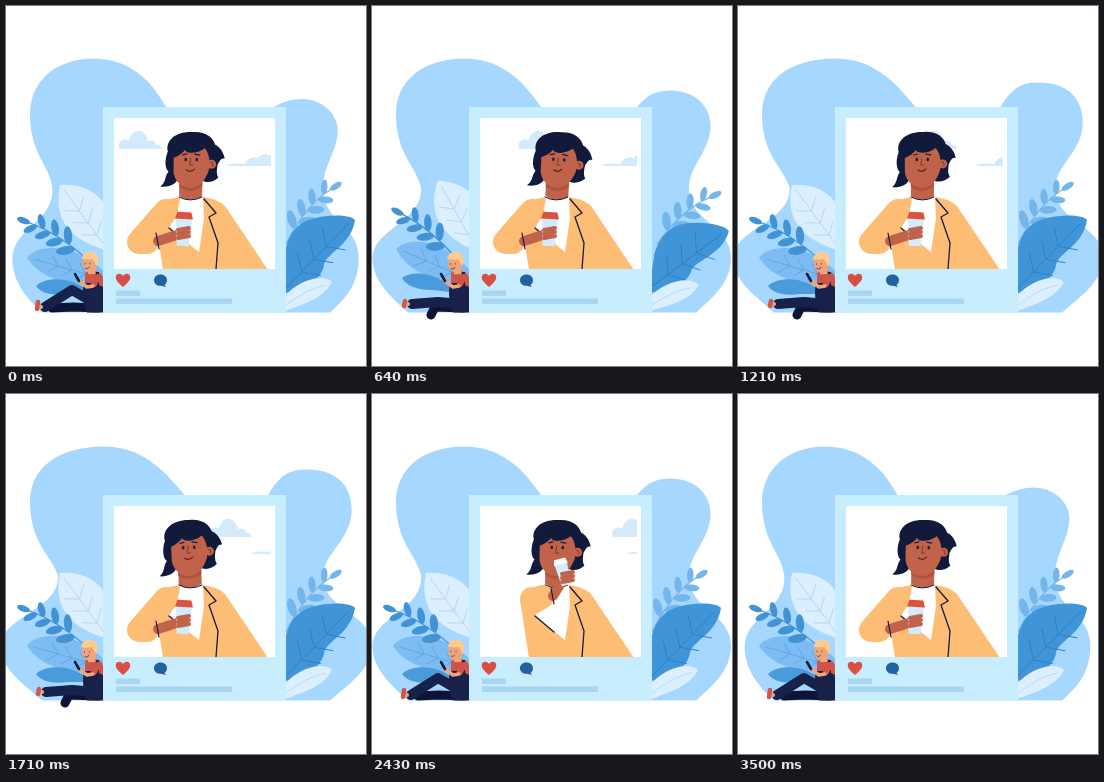
An HTML page that plays this animation: 360 px wide and 360 px high, repeating every 3.57 s.

```html
<!DOCTYPE html>
<html lang="en">
<head>
<meta charset="utf-8">
<title>Photo post</title>
<style>
html, body { margin: 0; width: 100%; height: 100%; overflow: hidden; background: #fff; }
svg { display: block; width: 100vw; height: 100vh; }
.line { fill: none; stroke-linecap: round; stroke-linejoin: round; }
.navy { stroke: #141c40; }
.skin { stroke: #c0634a; }
.tan { stroke: #eda67c; }
</style>
</head>
<body>
<svg viewBox="0 0 360 360">
  <defs>
    <clipPath id="sky"><rect x="108" y="112" width="157" height="151"/></clipPath>
    <clipPath id="photo"><rect x="108" y="112" width="161" height="151"/></clipPath>
  </defs>

  <path id="blob" fill="#a6d7ff"/>

  <g id="leftLeaves">
    <path fill="#dceffe" d="M54 179C78 177 97 188 104 210L108 246C80 240 44 224 54 179Z"/>
    <path id="lightVeins" class="line" stroke="#b0d8f8"/>
    <path fill="#7cbcf3" d="M21 252C30 237 72 236 100 268V280C66 279 36 275 21 252Z"/>
    <path id="midVeins" class="line" stroke="#62a8e2"/>
    <path fill="#4a9bdb" d="M30 280C40 270 68 270 86 288H62C48 290 36 288 30 280Z"/>
    <g id="leftBranch" fill="#4193d6" stroke="#4193d6"></g>
  </g>

  <g id="rightLeaves">
    <g id="rightBranch" fill="#74b5eb" stroke="#74b5eb"></g>
    <path fill="#3f95d8" d="M349 214C345 207 305 207 291 221C284 228 280 238 279 248V287C300 284 316 272 318 259C320 247 345 240 349 214Z"/>
    <path id="darkVeins" class="line" stroke="#2f80c2"/>
  </g>
  <g id="paleLeaf">
    <path fill="#dceffe" d="M326 276C316 266 290 276 279 290V305C298 298 318 292 326 276Z"/>
    <path class="line" stroke="#b9ddf8" d="M319 279C305 282 292 290 280 299"/>
  </g>

  <rect x="97" y="101" width="183" height="205.5" fill="#c7edff"/>
  <rect x="108" y="112" width="161" height="151" fill="#fff"/>
  <path fill="#d94e45" d="M117 281C111 276 109 273 110 270C111 267 115 267 117 270C119 267 123 267 124 270C125 273 123 276 117 281Z"/>
  <path fill="#22609f" d="M154.500 268.500C158.500 268.500 161 271 161 274C161 276 160 278 158.500 279L160 281L155 279.800C150.500 279.800 148 277.500 148 274C148 271 150.500 268.500 154.500 268.500Z"/>
  <path fill="#a9d7f3" d="M110 284.500H134V290H110ZM110 292.500H226V298H110Z"/>

  <g clip-path="url(#sky)" fill="#d4eafb">
    <path id="cloudA" d="M0 143V137C2 133 7 133 10 134C12 127 17 124 21 125C26 126 28 131 29 135C34 133 37 137 38 139C41 139 43 141 43 143Z"/>
    <path id="cloudB" d="M0 160C4 157 10 157 19 158C21 152 28 150 32 152C35 147 45 147 46 152V160Z"/>
  </g>

  <g clip-path="url(#photo)">
    <path fill="#fdbd74" d="M174 191C162 193 150 195 148 206L157 264H262L221 203C217 196 209 193 197 191Z"/>
    <path fill="#fff" d="M174 191H197L198 212L193 246C186 240 175 232 163 222C168 213 173 205 174 191Z"/>
    <path class="line navy" stroke-width="1.300" d="M198 193L210 207L203 211L212 237L210 263M163 222L182 238M160 208L167 210"/>
    <g id="head">
      <path fill="#111a3b" d="M161 146C158 134 170 125 186 126C198 125 206 131 208 138C214 141 217 147 218 152C214 151 213 155 211 158C210 164 210 168 212 171C207 176 200 177 195 174H171C169 179 162 182 154 181C160 177 158 171 162 166C158 163 158 153 161 146Z"/>
      <path fill="#c0634a" d="M173 168H196V190C190 195 179 195 173 190Z"/>
      <path fill="#b0503f" d="M173 176C181 183 190 182 196 176V180C189 186 180 186 173 181Z"/>
      <circle cx="205" cy="158" r="4.500" fill="#c0634a"/>
      <path fill="#c0634a" d="M167 152C172 150 176 147 178 144C180 148 190 148 198 142C203 148 204 158 202 165C198 176 192 182 184 182C174 182 168 174 167 166Z"/>
      <path class="line" stroke="#7d3a2c" d="M204 156Q207 156 206 160M184 152L183 159H186"/>
      <path class="line navy" stroke-width="2.400" d="M179 153V154M190 153V154"/>
      <path class="line navy" stroke-width="1.200" d="M176 149L180 148M188 148L193 149"/>
      <path id="smile" class="line" stroke="#5b241f" stroke-width="1.200" d="M180 164Q184 167 188 163"/>
    </g>
    <path class="line navy" d="M173 191Q184 197 196 191"/>
    <path id="sleeve" class="line" stroke="#fdbd74" stroke-width="24"/>
    <path id="wrist" class="line skin" stroke-width="10"/>
    <path id="cuff" class="line navy" stroke-width="1.200"/>
    <g id="cup">
      <path fill="#d3ebfa" d="M-8 -11H8L6 17H-6Z"/>
      <path id="lid" d="M-7 -17H7L9 -10H-9Z"/>
    </g>
    <path id="fingers" class="line skin" stroke-width="4"/>
  </g>

  <g id="man">
    <path id="farLeg" class="line" stroke="#0e1534" stroke-width="9"/>
    <path id="nearLeg" class="line" stroke="#18214a" stroke-width="10"/>
    <path id="ankle" class="line tan" stroke-width="4"/>
    <path id="shoe" class="line" stroke="#d0584a" stroke-width="4.500"/>
    <path fill="#cf5549" d="M79 267C87 263 97 265 97 273V290H79Z"/>
    <path fill="#18214a" d="M78 277H90V266H93V279L97 281V306.500H81C77 296 76 286 78 277Z"/>
    <path class="line" stroke="#cf5549" stroke-width="6" d="M92 271L88 278"/>
    <path class="line tan" stroke-width="3.500" d="M87 280L81 281L73 275"/>
    <path class="line navy" stroke-width="2.600" d="M69 268L73 275"/>
    <g id="manHead">
      <path fill="#eda67c" d="M77 253C81 247 90 248 91 256L89 268H82V265C77 265 76 260 77 253Z"/>
      <path fill="#ffcb8c" d="M76 253C76 247 82 245 86 246C92 247 94 254 91 260C89 259 89 255 86 253C83 254 80 253 76 253Z"/>
      <path class="line" stroke="#9c4a38" d="M79 257V258M84 257V258M79 262Q81 264 83 261"/>
    </g>
  </g>
</svg>
<script>
const LOOP = 3570;
const $ = id => document.getElementById(id);
const set = (id, name, value) => $(id).setAttribute(name, value);
const clamp = k => Math.min(1, Math.max(0, k));

// Eased rise from 0 to 1 between two times
function ramp(t, from, to) {
  const k = clamp((t - from) / (to - from));
  return k * k * (3 - 2 * k);
}
// Single swing 0-1-0 between two times
const pulse = (t, from, to) => Math.sin(Math.PI * clamp((t - from) / (to - from))) ** 2;
const path = (...points) => "M" + points.map(p => p.join(" ")).join("L");

// Leaflets alternate along the stem, leaning towards its tip
function branch(id, stem, count) {
  const group = $(id);
  group.innerHTML = `<path class="line" stroke-width="1.3" d="${stem}"/>`;
  const line = group.firstChild, length = line.getTotalLength();
  let leaves = "";
  for (let i = 0; i < count; i++) {
    const at = length * (.25 + .75 * i / (count - 1));
    const a = line.getPointAtLength(at - 2), b = line.getPointAtLength(at);
    const size = 9.5 - 3 * i / count;
    const side = i === count - 1 ? 0 : i % 2 ? 48 : -48;
    const angle = Math.atan2(b.y - a.y, b.x - a.x) * 180 / Math.PI + side;
    leaves += `<ellipse cx="${size}" rx="${size}" ry="${size * .45}" stroke="none"
      transform="translate(${b.x} ${b.y}) rotate(${angle})"/>`;
  }
  group.innerHTML += leaves;
}

// Midrib from base to tip with pairs of side veins
function veins(id, [bx, by], [tx, ty], reach) {
  const dx = tx - bx, dy = ty - by;
  let d = path([bx, by], [tx, ty]);
  for (let k = .25; k < .8; k += .2) {
    const x = bx + dx * k, y = by + dy * k;
    for (const side of [-reach, reach])
      d += path([x, y], [x + dx * .12 - dy * side, y + dy * .12 + dx * side]);
  }
  set(id, "d", d);
}

branch("leftBranch", "M82 254C62 236 43 224 24 217", 8);
branch("rightBranch", "M280 238C292 214 308 194 324 184", 8);
veins("lightVeins", [102, 244], [58, 184], .16);
veins("midVeins", [97, 273], [28, 253], .12);
veins("darkVeins", [280, 282], [342, 218], .18);

// s swells the background from its narrow to its wide form
function drawBlob(s) {
  const left = 7 - 13 * s, right = 352 + 14 * s;
  const top = 94 - 19 * s, edge = 331 + 15 * s;
  const waist = 46 + 6 * s, crest = 86 + 12 * s;
  set("blob", "d", `M36 306.5C20 292 ${left} 275 ${left} 253
    C${left} 222 ${waist + 3} 216 ${waist} 181C44 160 24 148 24 108
    C24 75 50 53 ${crest} 52.5C${crest + 36} 52.5 ${crest + 58} 73 ${crest + 73 + 8 * s} 101
    H${268 - 6 * s}C${277 - 2 * s} ${top + 3} 286 ${top} ${296 + 5 * s} ${top}
    C${edge - 16} ${top} ${edge} ${top + 15} ${edge} ${top + 30 + 11 * s}
    C${edge} 145 317 160 317 182C317 217 ${right} 218 ${right} 252
    C${right} 275 343 290 324 306.5Z`);
}

// up lifts the arm to the chin, tip brings the cup to the mouth
function drawArm(up, tip) {
  const elbow = [133 + 21 * up + 7 * tip, 236 - 24 * up - 4 * tip];
  const wrist = [141 + 24 * up + 5 * tip, 236 - 26 * up - 7 * tip];
  const [x, y] = [174 + 10 * up + 8 * tip, 228 - 35 * up - 9 * tip];
  const [cx, cy] = [177.5 + 9.5 * up + 4 * tip, 223 - 31 * up - 14 * tip];
  const [wx, wy] = wrist;
  set("sleeve", "d", path([160, 205], elbow, wrist));
  set("wrist", "d", path([wx + 11, wy - 1], [x, y]));
  set("cuff", "d", path([wx + 9, wy - 9], [wx + 12, wy + 7]));
  set("cup", "transform", `translate(${cx} ${cy}) rotate(${3 - 18 * tip}) scale(${1 - .1 * up - .1 * tip})`);
  set("lid", "fill", tip > .5 ? "#f4f9fd" : "#d9533f");
  set("smile", "opacity", 1 - tip);
  set("fingers", "d", [-4, 0, 4].map(dy => path([x - 2, y + dy], [x + 9, y + dy - 2])).join(""));
}

// k is 0 with the knee up, 1 with the legs stretched
function drawMan(k) {
  const x = 39 + k, y = 301 - 3 * k;
  set("nearLeg", "d", path([90, 298], [66, 284 + 12 * k], [x, y]));
  set("farLeg", "d", path([92, 302], [67 - 4 * k, 301], [46 + 13 * k, 302 + 7 * k]));
  set("ankle", "d", path([x - 4, y], [x - 7, y - 1]));
  set("shoe", "d", path([x - 8, y + 2], [x - 7, y - 5 + 2 * k]));
  set("manHead", "transform", `rotate(${-3 * k} 87 267)`);
}

function draw(t) {
  drawBlob((1 + Math.cos((t - 1535) / LOOP * 2 * Math.PI)) / 2);

  const sway = pulse(t, 0, 1210);
  set("leftLeaves", "transform", `rotate(${7 * sway} 95 275)`);
  set("rightLeaves", "transform", `rotate(${9 * sway} 280 270)`);
  set("paleLeaf", "transform", `rotate(${4 * sway} 280 290)`);

  set("cloudA", "transform", `translate(${113 + t * .0525})`);
  set("cloudB", "transform", `translate(${220 + t * .0145})`);

  const tilt = 1 + 2.2 * sway - 3.5 * pulse(t, 900, 2400);
  set("head", "transform", `rotate(${tilt} 184 195)`);
  drawArm(ramp(t, 1760, 2080) - ramp(t, 2930, 3360), ramp(t, 2080, 2330) - ramp(t, 2520, 2930));
  drawMan(ramp(t, 0, 500) - ramp(t, 1800, 2290));
}

const start = performance.now();
function tick() {
  draw((performance.now() - start) % LOOP);
  requestAnimationFrame(tick);
}
tick();
</script>
</body>
</html>
```
